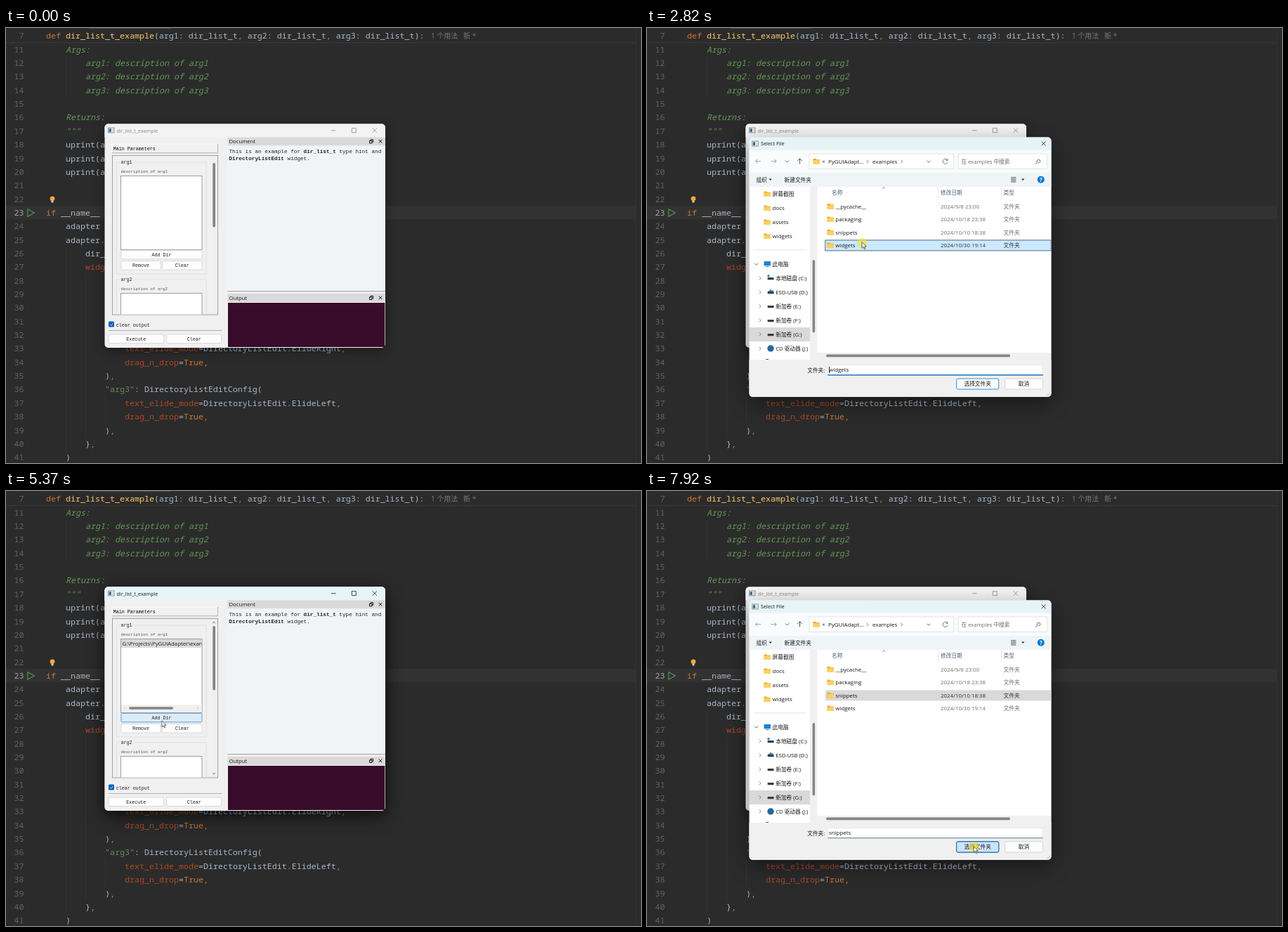
These frames come from a looping animation (904 by 619 pixels, 8000 ms). An HTML page:

```html
<!DOCTYPE html>
<html lang="en">
<head>
<meta charset="utf-8">
<title>dir_list_t_example</title>
<style>
html, body { margin: 0; width: 100%; height: 100%; overflow: hidden; background: #2b2b2b; }
svg { display: block; }
text { white-space: pre; }
.code { font: 11.67px "Noto Sans Mono", "DejaVu Sans Mono", monospace; fill: #a9b7c6; }
.num { fill: #606366; text-anchor: end; }
.doc { fill: #629755; font-style: italic; }
.kw { fill: #cc7832; } .fn { fill: #ffc66d; } .arg { fill: #aa4926; } .str { fill: #6a8759; }
.ui { font-family: "Open Sans", "Noto Sans CJK SC", "Noto Sans CJK", sans-serif; font-size: 7.9px; fill: #1a1a1a; }
.cn { font-size: 7.7px; }
.mono { font-family: "Liberation Mono", monospace; font-size: 6.67px; fill: #222; }
.mid { text-anchor: middle; }
.line { fill: none; stroke: #333; stroke-width: .8; }
.soft { filter: drop-shadow(0 4px 8px rgba(0,0,0,.4)); }
.deep { filter: drop-shadow(0 9px 14px rgba(0,0,0,.45)); }

#dialog { transform-origin: 360px 340px; animation: dialog 8s ease-out infinite; }
@keyframes dialog {
  0%, 13.74% { opacity: 0; transform: scale(.88); }
  13.75% { opacity: .3; transform: scale(.88); }
  16.25%, 48% { opacity: 1; transform: none; }
  49.6%, 80.62% { opacity: 0; transform: scale(.92); }
  80.63% { opacity: .3; transform: scale(.88); }
  83.1%, 100% { opacity: 1; transform: none; }
}
#pointer { animation: move 8s ease-in-out infinite; }
@keyframes move {
  0%, .87% { transform: translate(637px, 300px); }
  4.25%, 14.4% { transform: translate(240px, 320px); }
  20.6% { transform: translate(380px, 292px); }
  22.4% { transform: translate(372px, 301.5px); }
  31.1% { transform: translate(306px, 304px); }
  32%, 36.3% { transform: translate(306px, 304.5px); }
  44.75%, 48.75% { transform: translate(465px, 505.5px); }
  54.9%, 56.3% { transform: translate(268px, 300px); }
  63.75%, 65.6% { transform: translate(238px, 334px); }
  68.75%, 81.6% { transform: translate(204px, 319px); }
  85.1% { transform: translate(319px, 295px); }
  87.9%, 90% { transform: translate(303px, 291.5px); }
  98.5%, 100% { transform: translate(465px, 505.5px); }
}
#busy { animation: spin .8s linear infinite; }
@keyframes spin { to { transform: rotate(360deg); } }
</style>
</head>
<body>
<script>
const LOOP = 8000;
const R = (x, y, w, h, fill, stroke = 'none', rx = 0) =>
  `<rect x="${x}" y="${y}" width="${w}" height="${h}" rx="${rx}" fill="${fill}" stroke="${stroke}" stroke-width=".8"/>`;
const T = (x, y, s, cls, more = '') => `<text x="${x}" y="${y}" class="${cls}" ${more}>${s}</text>`;
const P = (d, more = '') => `<path class="line" d="${d}" ${more}/>`;
const C = (x, y, r, fill) => `<circle cx="${x}" cy="${y}" r="${r}" fill="${fill}"/>`;
const ink = c => `style="stroke:${c}"`;
const fillOf = c => `style="fill:${c}"`;
const size = px => `style="font-size:${px}px"`;
const during = (spans, body) => `<g data-on="${spans}">${body}</g>`;
const list = (n, f) => Array.from({ length: n }, (_, i) => f(i)).join('');

// Editor
const LINES = [
  [11, 4, 'Args:', 1], [12, 8, 'arg1: description of arg1', 1], [13, 8, 'arg2: description of arg2', 1],
  [14, 8, 'arg3: description of arg3', 1], [16, 4, 'Returns:', 1], [17, 4, '"""', 1],
  [18, 4, 'uprint(arg1)'], [19, 4, 'uprint(arg2)'], [20, 4, 'uprint(arg3)'],
  [23, 0, 'if __name__ == "__main__":'], [24, 4, 'adapter = GUIAdapter()'], [25, 4, 'adapter.add('],
  [26, 8, 'dir_list_t_example,'], [27, 8, 'widget_configs={'],
  [33, 16, 'text_elide_mode=DirectoryListEdit.ElideRight,'], [34, 16, 'drag_n_drop=True,'], [35, 12, '),'],
  [36, 12, '"arg3": DirectoryListEditConfig('], [37, 16, 'text_elide_mode=DirectoryListEdit.ElideLeft,'],
  [38, 16, 'drag_n_drop=True,'], [39, 12, '),'], [40, 8, '},'], [41, 4, ')']
];
const TOKEN = /("[^"]*")|\b(def|if|True)\b|(,)|(\w+)(?==)|(\w+)(?=\(arg1:)/g;
const paint = s => s.replace(TOKEN, (m, str, kw, comma, arg) =>
  `<tspan class="${str ? 'str' : kw || comma ? 'kw' : arg ? 'arg' : 'fn'}">${m}</tspan>`);
const rowY = n => 34.7 + (n - 11) * 19.35;
const guide = (x, y1, y2) => P(`M${x} ${y1}V${y2}`, ink('#373737'));

function editor() {
  return R(0, 0, 904, 619, '#2b2b2b') + R(0, 253, 896, 19.3, '#323232')
    + guide(85.5, 41, 98) + guide(85.5, 312, 601) + guide(113.5, 350, 583) + guide(141.5, 525, 563)
    + guide(896.5, 0, 619) + P('M0 20.8H896', ink('#3e4042')) + P('M118 .4H235', ink('#5a5d5f'))
    + T(25.5, 15, 7, 'code num')
    + T(57, 15, paint('def dir_list_t_example(arg1: dir_list_t, arg2: dir_list_t, arg3: dir_list_t):'), 'code')
    + T(605, 14.5, '1 个用法   新 *', 'ui', 'style="font-size:10px;fill:#787878"')
    + list(31, i => T(25.5, rowY(i + 11), i + 11, 'code num', i === 12 ? fillOf('#a4a3a3') : ''))
    + LINES.map(([n, indent, s, doc]) =>
        T(57 + indent * 7, rowY(n), doc ? s : paint(s), doc ? 'code doc' : 'code')).join('')
    + C(66, 242.8, 3.4, '#f2a93b') + R(64.5, 246, 3, 2.5, '#c9c9c9')
    + P('M30.8 257.8L40.3 263L30.8 268.2Z', 'style="stroke:#57965c;stroke-width:1.1"');
}

// Main window
const button = (x, y, w, s, fill = '#fdfdfd', stroke = '#d2d2d2') =>
  R(x, y, w, 12.5, fill, stroke, 1.5) + T(x + w / 2, y + 8.6, s, 'mono mid');
const hot = (x, y, w, s) => button(x, y, w, s, '#dcebf8', '#3a94da');
const appIcon = (x, y) => R(x, y, 8.5, 7, '#fff', '#777') + R(x + 1, y + 1.2, 3.4, 4.8, '#3c6e8f') + R(x + 5.5, y + 1.2, 2, 4.8, '#c9d6dd');

const titleBar = (bg, fg) =>
  `<path d="M140.5 155.5V141.5a5 5 0 0 1 5-5H535a5 5 0 0 1 5 5V155.5Z" fill="${bg}"/>`
  + appIcon(145.5, 142) + T(157.5, 148.6, 'dir_list_t_example', 'ui', `style="font-size:7.1px;fill:${fg}"`)
  + P('M463 145.8h6.5M492.3 142.7h6v6h-6ZM521.7 142.5l6.3 6.3m0-6.3l-6.3 6.3', ink(fg));

const dock = (y, name) => R(315.5, y, 224.2, 12, '#dadada') + T(317.5, y + 8.9, name, 'ui', size(7.7))
  + P(`M517.5 ${y + 5}h3.6v3.4h-3.6ZM519 ${y + 5}v-1.7h3.6v3.4h-1.4M530.8 ${y + 3.6}l4.4 4.4m0-4.4l-4.4 4.4`, 'style="stroke:#111;stroke-width:1"');

const group = (y, name) => R(157.5, y, 127.5, 159, 'none', '#dcdcdc') + R(161.5, y - 3, 20, 6, '#f0f0f0')
  + T(163.5, y + 2.2, name, 'mono') + T(163.5, y + 15, 'description of ' + name, 'mono', 'style="font-size:5.83px;fill:#555"')
  + R(163.5, y + 19.5, 115.5, 105, '#fff', '#85898e');

function mainWindow() {
  const frame = cls => `<g class="${cls}">${R(140.5, 136.5, 399.5, 318.5, '#f0f0f0', 'none', 5)}</g>`;
  const item = R(164, 211, 114.6, 12, '#d9d9d9')
    + `<g clip-path="url(#item)">${T(165.5, 219.8, 'G:\\Projects\\PyGUIAdapter\\examples', 'ui', size(7.8))}</g>`
    + R(164, 304, 114.6, 10.8, '#f0f0f0') + R(175, 307.3, 63, 3.4, '#858585', 'none', 1.7)
    + P('M170 307.5l-2 1.7 2 1.7M272 307.5l2 1.7-2 1.7', ink('#c4c4c4'));
  const panel = R(151.5, 181.5, 150, 226.5, '#f0f0f0', '#8b8f94')
    + `<g clip-path="url(#panel)">${group(191, 'arg1')}${group(358, 'arg2')}</g>`
    + during('3850-8000', item)
    + button(164, 316.3, 115, 'Add Dir') + button(164, 331.5, 56, 'Remove') + button(222.5, 331.5, 56.5, 'Clear')
    + during('300-1100 4790-4930 5350-6500', hot(164, 316.3, 115, 'Add Dir'))
    + during('4980-5320', hot(222.5, 331.5, 56.5, 'Clear'))
    + R(294.3, 192, 3.7, 91.5, '#858585', 'none', 1.8)
    + during('4200-5700', '<path d="M296 184.7l2.6 3.6h-5.2ZM296 404.5l2.6-3.6h-5.2Z" fill="#b2b2b2"/>');
  const active = '400-1100 3850-6450';
  return frame('soft') + during(active, frame('deep'))
    + titleBar('#f3f3f3', '#8a8a8a') + during(active, titleBar('#e7f5f6', '#1a1a1a'))
    + R(150.5, 165, 151, 13, '#f1f1f1') + P('M150.5 178V165H301.5', ink('#fff')) + P('M150.5 177.8H301.5V165', ink('#a3a3a3'))
    + T(152.8, 174.4, 'Main Parameters', 'mono', fillOf('#000')) + panel
    + R(146, 417.6, 8, 8, '#005fb8', 'none', 1.6) + P('M148 421.6l1.6 1.7 2.7-3.2', ink('#fff'))
    + T(156.8, 424.6, 'clear output', 'mono') + P('M146 430.5H307.5', ink('#a0a0a0'))
    + button(146.2, 436, 78.2, 'Execute') + button(228.7, 436, 78, 'Clear')
    + dock(155.5, 'Document') + R(315.5, 167.5, 224.2, 207, '#f1f4f6') + P('M315.5 374.6H539.8', ink('#8a8a8a'))
    + T(317.5, 178, 'This is an example for <tspan font-weight="bold">dir_list_t</tspan> type hint and', 'mono', size(7.7))
    + T(317.5, 188.2, '<tspan font-weight="bold">DirectoryListEdit</tspan> widget.', 'mono', size(7.7))
    + dock(378, 'Output') + R(316, 391, 223.3, 63, '#380c2a');
}

// Folder dialog
const folder = (x, y) => `<path d="M${x} ${y - 3.6}h3.6l1.2 1.3h4.7v6.3h-9.5Z" fill="#e8a825"/>` + R(x, y - 1.6, 9.5, 5.6, '#fbd161', 'none', .6);
const chevron = (x, y) => P(`M${x - 1.2} ${y - 2.4}l2.4 2.4-2.4 2.4`, ink('#666'));
const down = (x, y) => P(`M${x - 2.5} ${y - 1.2}l2.5 2.5 2.5-2.5`, ink('#444'));
const FILES = [['__pycache__', '2024/9/8 23:00'], ['packaging', '2024/10/18 23:38'],
  ['snippets', '2024/10/10 18:38'], ['widgets', '2024/10/30 19:14']];
const fileY = i => 254 + i * 18.5;
const fileRow = (i, tone = '#6d6d6d') => folder(256.5, fileY(i) - .5) + T(268.3, fileY(i) + 2.8, FILES[i][0], 'ui')
  + T(418, fileY(i) + 2.8, FILES[i][1], 'ui', fillOf(tone)) + T(507.5, fileY(i) + 2.8, '文件夹', 'ui cn', fillOf(tone));
const band = (i, fill, stroke) => R(253.8, fileY(i) - 7.6, 321.4, 15, fill, stroke);
const picked = (i, fill, stroke) => band(i, fill, stroke) + fileRow(i, '#333');
const dlgButton = (x, w, s, fill, stroke) => R(x, 499, w, 15, fill, stroke, 2) + T(x + w / 2, 509.3, s, 'ui cn mid');

function sidebar() {
  const drives = ['本地磁盘 (C:)', 'ESD-USB (D:)', '新加卷 (E:)', '新加卷 (F:)', '新加卷 (G:)', 'CD 驱动器 (J:)'];
  const driveIcon = (i, y) => i === 5 ? C(176, y, 4.7, '#24679c')
    : R(171.6, y - 1, 9, 3.2, '#3d3d3d', 'none', .8) + (i === 0 ? R(171.5, y - 4.8, 3, 3, '#1683d8') : '')
      + (i === 1 ? `<path d="M172 ${y - 1}l5-3.6v2h3v2Z" fill="#3f7fa8"/>` : '');
  return R(146, 226, 86, 246, '#fff') + R(146, 426, 86, 20, '#d9d9d9')
    + ['屏幕截图', 'docs', 'assets', 'widgets'].map((s, i) =>
        folder(166.5, 236 + i * 20) + T(178.6, 238.8 + i * 20, s, i ? 'ui' : 'ui cn')).join('')
    + P('M152 316H227', ink('#dcdcdc')) + down(155.7, 336)
    + R(166.5, 332, 9.5, 6.3, '#1c84d4', 'none', .6) + R(169, 339, 4.5, 1, '#4d7d9c') + T(178.6, 338.9, '此电脑', 'ui cn')
    + drives.map((s, i) => chevron(161, 356 + i * 20) + driveIcon(i, 356 + i * 20) + T(183.2, 358.8 + i * 20, s, 'ui cn')).join('')
    + R(169, 471, 4, 1, '#555')
    + R(232, 226, 10.5, 246, '#f0f0f0') + R(235.6, 330, 3.5, 103.5, '#858585', 'none', 1.7);
}

function fileList() {
  return R(242.5, 226, 333, 236, '#fff') + R(242.5, 462, 333, 10, '#f0f0f0') + R(255, 464.6, 262, 3.6, '#858585', 'none', 1.8)
    + P('M414.5 226V243M504.5 226V243', ink('#e2e2e2')) + P('M334.8 228.6l2.3-1.9 2.3 1.9', ink('#777'))
    + [[263, '名称'], [418, '修改日期'], [507.5, '类型']].map(([x, s]) => T(x, 236.8, s, 'ui cn', fillOf('#4c607a'))).join('')
    + during('1475-1735 6730-7090', band(2, '#e5f3ff')) + during('1280-1475 1735-2820 6660-6730', band(3, '#e5f3ff'))
    + list(4, i => fileRow(i))
    + during('2820-3620', picked(3, '#cce8ff', '#2c4a60')) + during('3620-4000', picked(3, '#d9d9d9'))
    + during('7090-7920', picked(2, '#cce8ff', '#2c4a60')) + during('7920-8000', picked(2, '#d9d9d9'));
}

function dialog() {
  const choose = '选择文件夹';
  return `<g class="deep">${R(145.5, 155.5, 430, 369.5, '#f0f0f0', 'none', 5)}</g><g clip-path="url(#dlg)">`
    + R(145, 155, 431, 18.5, '#e6f4f6') + R(145, 173.5, 431, 33, '#f9fbfc') + R(145, 206.5, 431, 19.5, '#eff4f6')
    + appIcon(149.8, 161) + T(162, 167.3, 'Select File', 'ui', size(7.3)) + P('M561.7 161.4l5.8 5.8m0-5.8l-5.8 5.8', ink('#111'))
    + P('M162 189.7h-7.5m3-3l-3 3 3 3M176.5 189.7h7.5m-3-3l3 3-3 3', ink('#8c8c8c')) + down(199.5, 189.7)
    + P('M217.5 193.5v-7.7m-3.2 3.2l3.2-3.2 3.2 3.2')
    + R(231, 179, 205.8, 21.5, '#fff', '#dadcdd') + folder(236.5, 189.5) + T(249.5, 192.4, '«', 'ui')
    + T(258, 192.6, 'PyGUIAdapt...', 'ui') + chevron(314, 190) + T(321, 192.6, 'examples', 'ui') + chevron(362.5, 190)
    + down(401, 190) + P('M427.6 188a3.5 3.5 0 1 0 .4 3M428 185.8v2.6h-2.6', ink('#555'))
    + R(443.2, 179, 126, 21.5, '#fff', '#dadcdd') + T(447.5, 192.6, '在 examples 中搜索', 'ui cn', fillOf('#6a6a6a'))
    + P('M555.8 191.2a2.3 2.3 0 1 1 1.6 .7M555.8 191.2l-2.6 2.6')
    + T(155.5, 218.6, '组织', 'ui cn') + T(195.5, 218.6, '新建文件夹', 'ui cn')
    + '<path d="M173.5 214.5h4.4l-2.2 2.5ZM533 214.5h4.4l-2.2 2.5Z" fill="#333"/>'
    + P('M518 212.7h7.5M518 214.8h7.5M518 216.9h7.5M518 219h7.5') + C(560.8, 215.7, 5, '#0078d4')
    + T(560.8, 218.5, '?', 'ui mid', 'style="fill:#fff;font-weight:bold"')
    + sidebar() + fileList()
    + R(145, 472, 431, 54, '#f0f0f0') + T(228.2, 490, '文件夹:', 'ui cn')
    + R(257.5, 479.7, 306, 14, '#fff', '#e3e3e3') + R(257.3, 493.2, 306.4, 1.3, '#0067c0')
    + during('3620-4000 7920-8000', R(257.3, 493.2, 306.4, 1.3, '#f0f0f0') + R(257.3, 493.2, 306.4, .7, '#868686'))
    + during('2820-4000', T(259, 489.4, 'widgets', 'ui')) + during('7090-8000', T(259, 489.4, 'snippets', 'ui'))
    + during('1240-1770 2290-2890 6600-7130', R(259, 481.8, .9, 9.5, '#111'))
    + dlgButton(440.7, 60, choose, '#fdfdfd', '#0078d4') + dlgButton(509.5, 53.8, '取消', '#fdfdfd', '#d0d0d0')
    + during('3500-4000 7800-8000', dlgButton(440.7, 60, choose, '#e0eef9', '#0078d4'))
    + during('3620-3760 7920-8000', dlgButton(440.7, 60, choose, '#cce4f7', '#005499'))
    + P('M569 523.5l5-5M571.5 523.8l2.5-2.5', ink('#b5b5b5')) + '</g>';
}

const pointer = during('360-500 2820-2960 3620-3760 5700-5850 7090-7230 7920-8000', `<g opacity=".65">${C(.5, 1.5, 7, '#f5e62e')}</g>`)
  + during('70-500 1150-5850 6530-8000',
      '<path d="M0 0V8.8L2.1 6.9L3.6 10.2L5 9.6L3.5 6.4H6.3Z" fill="#fff" stroke="#333" stroke-width=".75"/>')
  + during('500-1150 5850-6530', '<circle r="4" fill="#d6ecfa" stroke="#1484d6" stroke-width="2.2"/>'
      + '<path id="busy" d="M0 -4A4 4 0 0 1 4 0" fill="none" stroke="#6cc0f5" stroke-width="2.2"/>');

const clip = (id, rect) => `<clipPath id="${id}">${rect}</clipPath>`;
document.body.innerHTML = '<svg width="904" height="619" viewBox="0 0 904 619"><defs>'
  + clip('item', R(164, 211, 114.5, 12, '#000')) + clip('panel', R(152, 182, 149, 225.6, '#000'))
  + clip('dlg', R(145.5, 155.5, 430, 369.5, '#000', 'none', 5)) + '</defs>'
  + editor() + mainWindow() + `<g id="dialog">${dialog()}</g><g id="pointer">${pointer}</g></svg>`;

// Turn each data-on list of "start-end" spans into stepped keyframes.
const sheet = document.createElement('style');
document.querySelectorAll('[data-on]').forEach((el, i) => {
  const at = (ms, o) => `${ms * 100 / LOOP}%{opacity:${o}}`;
  const steps = el.dataset.on.split(' ').map(s => s.split('-')).map(([a, b]) => at(a, 1) + at(b, 0)).join('');
  sheet.textContent += `@keyframes on${i}{${at(0, 0)}${steps}}`;
  el.style.animation = `on${i} ${LOOP}ms step-end infinite`;
});
document.head.append(sheet);
</script>
</body>
</html>
```
